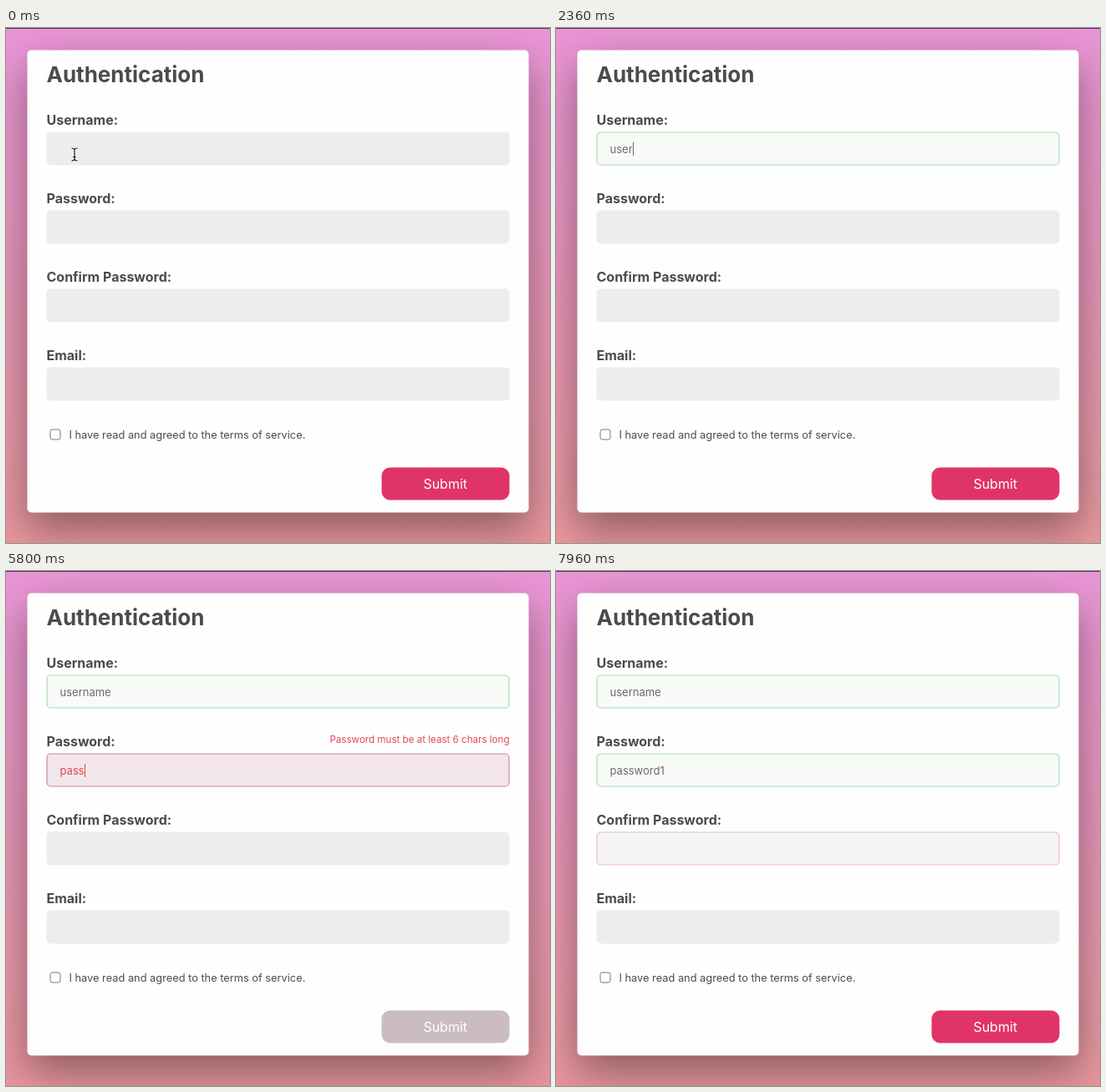
Animation of 651x617 px, one loop 8 s. Source, as an HTML page with a canvas:

```html
<!DOCTYPE html>
<html lang="en">
<head>
<meta charset="utf-8">
<title>Authentication form</title>
<style>
html, body { margin: 0; width: 100%; height: 100%; overflow: hidden; }
canvas { display: block; }
</style>
</head>
<body>
<canvas id="stage" width="651" height="617"></canvas>
<script>
const ctx = document.getElementById('stage').getContext('2d');
const LOOP = 8000, TICK = 40, FADE = 200, BLINK = 485;
const INK = [75, 75, 79], RED = '#e04850', ORANGE = '#e0a53f';

// Field looks: background, border, text
const looks = {
  idle: [[237, 237, 237], [237, 237, 237], [106, 106, 106]],
  focus: [[245, 245, 245], [240, 180, 228], [106, 106, 106]],
  error: [[242, 230, 234], [209, 141, 138], [216, 72, 72]],
  weak: [[243, 237, 230], [220, 184, 112], [226, 164, 60]],
  valid: [[247, 250, 247], [168, 219, 174], [106, 106, 106]]
};
const button = { on: [[224, 52, 104]], off: [[203, 188, 193]] };

const fields = [
  {
    label: 'Username:', value: 'username',
    keys: [1720, 1960, 2160, 2320, 2600, 2800, 2960, 3160],
    states: [[60, 'focus'], [1720, 'error'], [2160, 'valid']],
    carets: [105], blur: 3760,
    notes: [[1720, 2160, 'Username must be at least 3 chars long', RED]]
  },
  {
    label: 'Password:', value: 'password1',
    keys: [5280, 5400, 5520, 5800, 5960, 6160, 6280, 6400, 6880],
    states: [[3760, 'focus'], [5280, 'error'], [6160, 'weak'], [6880, 'valid']],
    carets: [3795], blur: 7380,
    notes: [
      [5280, 6160, 'Password must be at least 6 chars long', RED],
      [6160, 6880, 'Password is weak, Maybe add a number?', ORANGE]
    ]
  },
  {
    label: 'Confirm Password:', value: '', keys: [],
    states: [[7380, 'focus']], carets: [7460], blur: LOOP, notes: []
  },
  { label: 'Email:', value: '', keys: [], states: [], carets: [], blur: 0, notes: [] }
];
const buttonStates = [[1720, 'off'], [2160, 'on'], [5280, 'off'], [6160, 'on']];

const rgb = c => `rgb(${c.map(Math.round).join()})`;
const mix = (a, b, k) => a.map((v, i) => v + (b[i] - v) * k);

// CSS "ease": cubic-bezier(.25, .1, .25, 1)
function ease(x) {
  if (x <= 0 || x >= 1) return x <= 0 ? 0 : 1;
  const bezier = (a, b, s) => 3 * a * s * (1 - s) ** 2 + 3 * b * s * s * (1 - s) + s ** 3;
  let low = 0, high = 1;
  for (let i = 0; i < 20; i++) {
    const mid = (low + high) / 2;
    if (bezier(0.25, 0.25, mid) < x) low = mid; else high = mid;
  }
  return bezier(0.1, 1, low);
}

function lookAt(states, palette, initial, t) {
  let look = palette[initial];
  for (const [start, name] of states) {
    const k = ease((t - start) / FADE);
    look = look.map((c, i) => mix(c, palette[name][i], k));
  }
  return look;
}

function box(x, y, w, h, r, fill, stroke, width = 1) {
  ctx.beginPath();
  ctx.roundRect(x, y, w, h, r);
  if (fill) { ctx.fillStyle = fill; ctx.fill(); }
  if (stroke) { ctx.strokeStyle = stroke; ctx.lineWidth = width; ctx.stroke(); }
}

function text(str, x, y, size, color, weight = 400, align = 'left') {
  ctx.font = `${weight} ${size}px Inter, sans-serif`;
  ctx.textAlign = align;
  ctx.fillStyle = color;
  ctx.fillText(str, x, y);
}

function drawPage() {
  const sky = ctx.createLinearGradient(0, 0, 0, 617);
  sky.addColorStop(0, '#e995d6');
  sky.addColorStop(1, '#e8979c');
  ctx.fillStyle = sky;
  ctx.fillRect(0, 0, 651, 617);
  ctx.save();
  ctx.shadowColor = 'rgba(0,0,0,.4)';
  ctx.shadowBlur = 50;
  ctx.shadowOffsetY = 20;
  box(25.5, 26.5, 600, 554, 5, '#fefefe');
  ctx.restore();
  ctx.fillStyle = '#4b3c4b';
  ctx.fillRect(0, 0, 651, 1);
  text('Authentication', 48.5, 64.5, 26, rgb(INK), 700);
  box(53, 481, 12, 12, 2.5, '#fff', '#767676');
  text('I have read and agreed to the terms of service.', 75.5, 491.5, 12.8, rgb(INK));
}

function drawField(field, index, t) {
  const top = 124.5 + index * 94;
  const [back, border, ink] = lookAt(field.states, looks, 'idle', t);
  text(field.label, 48.5, top - 9, 16, rgb(INK), 700);
  box(49, top + 0.5, 553, 39, 4.5, rgb(back), rgb(border), 1.2);

  const typed = field.value.slice(0, field.keys.filter(k => k <= t).length);
  text(typed, 64.5, top + 25, 13, rgb(ink));

  const resets = [...field.carets, ...field.keys].filter(k => k <= t);
  if (resets.length && t < field.blur) {
    const phase = Math.floor((t - resets[resets.length - 1]) / BLINK);
    if (phase % 2 === 0) {
      const x = Math.round(64.5 + ctx.measureText(typed).width);
      ctx.fillRect(x, top + 12.5, 1, 16);
    }
  }
  for (const [from, to, note, color] of field.notes) {
    if (t >= from && t < to) text(note, 602.5, top - 13, 11.6, color, 400, 'right');
  }
}

function drawPointer(x, y) {
  ctx.beginPath();
  ctx.moveTo(x - 3.5, y - 7.5);
  ctx.quadraticCurveTo(x, y - 7.5, x, y - 5);
  ctx.lineTo(x, y + 5);
  ctx.quadraticCurveTo(x, y + 7.5, x - 3.5, y + 7.5);
  ctx.moveTo(x + 3.5, y - 7.5);
  ctx.quadraticCurveTo(x, y - 7.5, x, y - 5);
  ctx.moveTo(x, y + 5);
  ctx.quadraticCurveTo(x, y + 7.5, x + 3.5, y + 7.5);
  ctx.moveTo(x - 2, y + 3);
  ctx.lineTo(x + 2, y + 3);
  for (const [color, width] of [['#fff', 3], ['#161616', 1.2]]) {
    ctx.strokeStyle = color;
    ctx.lineWidth = width;
    ctx.stroke();
  }
}

function draw(now) {
  const t = Math.floor(now % LOOP / TICK) * TICK;
  drawPage();
  fields.forEach((field, i) => drawField(field, i, t));
  const [fill] = lookAt(buttonStates, button, 'on', t);
  box(449.5, 526.5, 153, 39, 10, rgb(fill));
  text('Submit', 525.7, 551.5, 16, '#fff', 400, 'center');
  if (t < 80) drawPointer(82, 151.5);
  else if (t < 1720) drawPointer(81, 152.5);
}

const started = performance.now();
function loop() {
  draw(performance.now() - started);
  requestAnimationFrame(loop);
}
loop();
</script>
</body>
</html>
```
